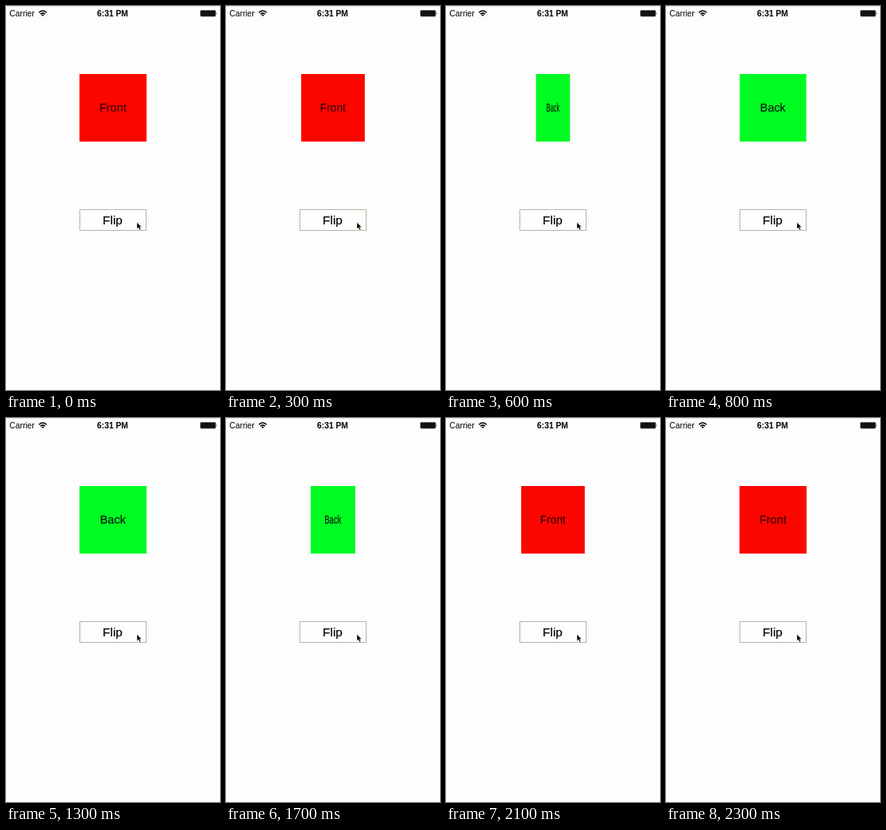
Write an HTML page that moves like this. It is 268 by 480 pixels and loops after 2.4 s.

```html
<!DOCTYPE html>
<html lang="en">
<head>
<meta charset="utf-8">
<title>Card flip</title>
<style>
  html, body { margin: 0; width: 100%; height: 100%; overflow: hidden; background: #fdfdfe; }
  svg { display: block; width: 268px; height: 480px; font-family: "Liberation Sans", Arial, sans-serif; }
</style>
</head>
<body>
<svg viewBox="0 0 268 480">
  <path d="M0 .5H268" stroke="#e6e6d8"/>

  <!-- status bar -->
  <g font-size="10.3">
    <text x="4.3" y="13">Carrier</text>
    <text x="133.5" y="13" text-anchor="middle" font-weight="bold">6:31 PM</text>
  </g>
  <g fill="none" stroke="#000" stroke-width="1.5">
    <path d="M41.2 8.2Q46 3.9 50.8 8.2M43 10.2Q46 7.5 49 10.2"/>
    <path d="M44.3 11.2Q46 9.8 47.7 11.2L46 13Z" fill="#000" stroke="none"/>
  </g>
  <rect x="243.5" y="5.5" width="19" height="7.5" rx="1.2" fill="#111" stroke="#555" stroke-width=".7"/>
  <path d="M263.6 7.8q1.6 1.4 0 2.9z" fill="#222"/>

  <g id="card">
    <rect id="face" x="-42" y="85" width="84" height="84.5"/>
    <text id="label" x="-.2" y="132.3" font-size="14.5" text-anchor="middle" stroke-width=".15"></text>
  </g>

  <rect x="92.5" y="254.5" width="83" height="26" fill="#fdfdfe" stroke="#b6b6a4"/>
  <text x="133.5" y="272.8" font-size="15.4" text-anchor="middle" stroke="#000" stroke-width=".2">Flip</text>
  <path d="M164 270.5v8.2l1.9-1.7 1.3 3 1.5-.7-1.3-2.8h2.5z" fill="#000" stroke="#fff" stroke-width=".4"/>
</svg>
<script>
  const LOOP = 2400, STEP = 100;
  const FRONT = { text: "Front", fill: "#fc0600", ink: "#380000" };
  const BACK = { text: "Back", fill: "#00fc22", ink: "#001a0c" };
  const [card, face, label] = ["card", "face", "label"].map(id => document.getElementById(id));

  // cubic-bezier(.42, 0, .58, 1), solved by bisection
  function ease(x) {
    if (x <= 0 || x >= 1) return x <= 0 ? 0 : 1;
    let lo = 0, hi = 1, u;
    for (let i = 0; i < 24; i++) {
      u = (lo + hi) / 2;
      const at = 3 * u * (1 - u) ** 2 * .42 + 3 * u * u * (1 - u) * .58 + u ** 3;
      if (at < x) lo = u; else hi = u;
    }
    return u * u * (3 - 2 * u);
  }

  function draw(t) {
    const turn = ease((t - 122) / 796) + ease((t - 1354) / 962);
    const c = Math.cos(turn * Math.PI);
    const side = c >= 0 ? FRONT : BACK;
    card.setAttribute("transform", `translate(134 0) scale(${Math.abs(c)} 1)`);
    face.setAttribute("fill", side.fill);
    label.setAttribute("fill", side.ink);
    label.setAttribute("stroke", side.ink);
    label.textContent = side.text;
  }

  const start = performance.now();
  function tick() {
    const t = (performance.now() - start) % LOOP;
    draw(Math.floor(t / STEP) * STEP);
    requestAnimationFrame(tick);
  }
  tick();
</script>
</body>
</html>
```
